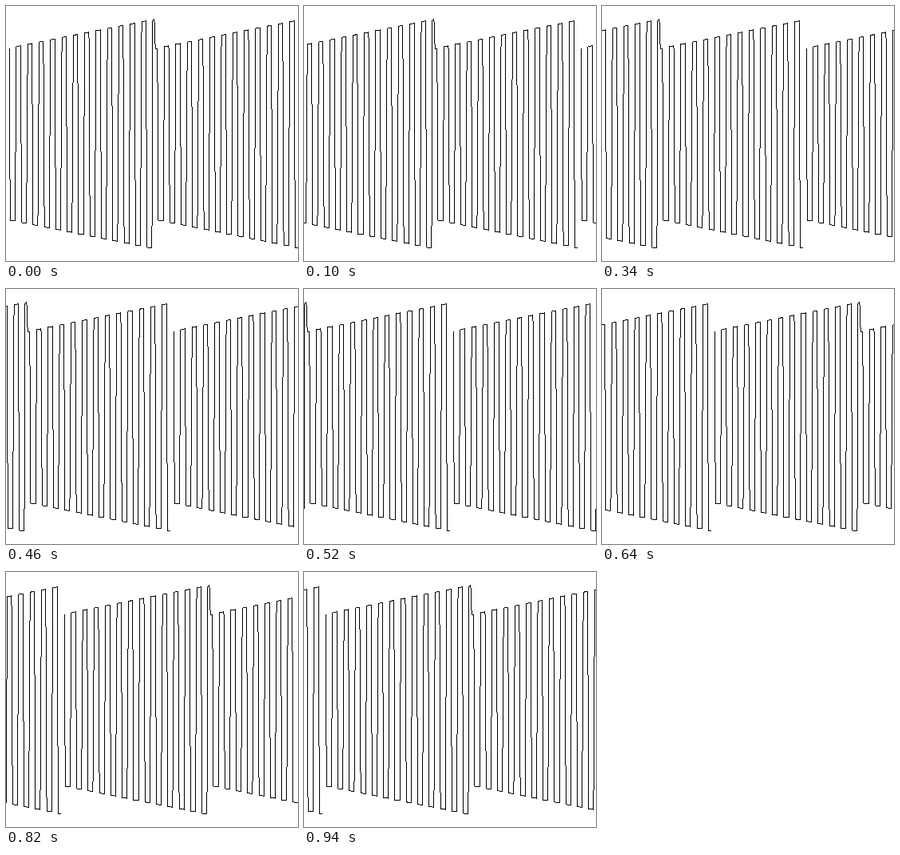
These frames come from a looping animation (366x319 px, 1000 ms). An HTML page with a canvas:

```html
<!DOCTYPE html>
<html lang="en">
<head>
<meta charset="utf-8">
<title>Scrolling wave</title>
<style>
  html, body { margin: 0; width: 100%; height: 100%; overflow: hidden; background: #fff; }
  canvas { display: block; }
</style>
</head>
<body>
<canvas id="stage" width="366" height="319"></canvas>
<script>
const WIDTH = 366, HEIGHT = 319;
const STEPS = 16, FIRST = 100, STEP = 60, LOOP = 1000;
const TEETH = 12, PITCH = 14.28, RISE = 2.82, SECOND = 185.7;

// A square wave that widens to the right; the last trough is left to the caller.
function teeth(x) {
  const points = [[x + 4.05, 53]];
  for (let k = 0; k < TEETH; k++) {
    const left = x + k * PITCH, dy = k * RISE;
    points.push(
      [left + 5.3, 268.1 + dy], [left + 11.35, 268.9 + dy],
      [left + 13, 50.7 - dy], [left + 18.28, 49.7 - dy]);
  }
  return points;
}

const wave = [
  ...teeth(0),
  [176.7, 301.9], [182.9, 302.6], [183.95, 18], [185.2, 16], [186, 20], [187.2, 53],
  ...teeth(SECOND),
  [SECOND + 176.7, 302], [365, 302]
];

// Hard-edged, one pixel wide lines, drawn once.
const strip = document.createElement("canvas");
strip.width = WIDTH;
strip.height = HEIGHT;
const pen = strip.getContext("2d");

function line([x0, y0], [x1, y1]) {
  const n = Math.ceil(Math.max(Math.abs(x1 - x0), Math.abs(y1 - y0)));
  for (let i = 0; i <= n; i++) {
    const u = i / n;
    pen.fillRect(Math.floor(x0 + (x1 - x0) * u), Math.floor(y0 + (y1 - y0) * u), 1, 1);
  }
}
for (let i = 1; i < wave.length; i++) line(wave[i - 1], wave[i]);

const ctx = stage.getContext("2d");

function draw(now) {
  const t = now % LOOP;
  const n = t < FIRST ? 0 : 1 + Math.floor((t - FIRST) / STEP);
  const x = Math.round(-n * WIDTH / STEPS);
  ctx.fillStyle = "#fff";
  ctx.fillRect(0, 0, WIDTH, HEIGHT);
  ctx.drawImage(strip, x, 0);
  ctx.drawImage(strip, x + WIDTH, 0);
}

const start = performance.now();
function tick() {
  draw(performance.now() - start);
  requestAnimationFrame(tick);
}
tick();
</script>
</body>
</html>
```
